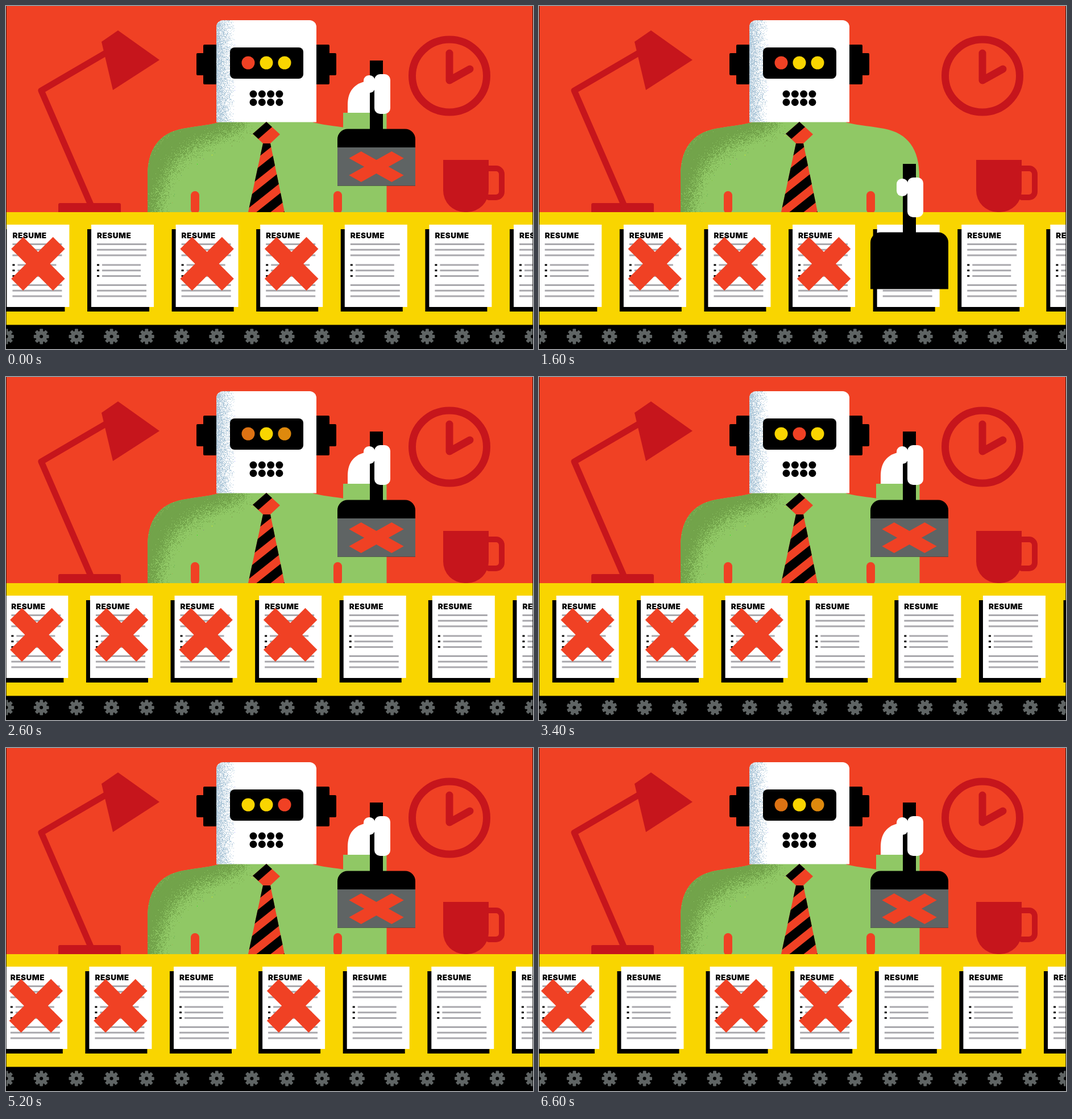
An HTML page with a canvas for the animation above (6800 ms loop, 927x604 px).

```html
<!DOCTYPE html>
<html lang="en">
<head>
<meta charset="utf-8">
<title>Resume robot</title>
<style>
html, body { margin: 0; width: 100%; height: 100%; overflow: hidden; background: #f04124; }
canvas { display: block; }
</style>
</head>
<body>
<canvas id="stage" width="927" height="604"></canvas>
<script>
const W = 927, H = 604, LOOP = 6800, STEP = 200, CYCLE = 4000 / 3;
const RED = '#f04124', DARK = '#c6151c', GREEN = '#90c865', SHADE = '#72a34a',
      YELLOW = '#f9d500', GRAY = '#5f6464', LINE = '#a9a8ad';
const stage = document.getElementById('stage').getContext('2d');
let g = stage;

const clamp = v => Math.max(0, Math.min(1, v));
const smooth = v => { v = clamp(v); return v * v * (3 - 2 * v); };

function box(color, x, y, w, h, r = 0) {
  g.fillStyle = color;
  g.beginPath();
  g.roundRect(x, y, w, h, r);
  g.fill();
}
function dot(color, x, y, r) {
  g.fillStyle = color;
  g.beginPath();
  g.arc(x, y, r, 0, Math.PI * 2);
  g.fill();
}
function shape(color, d) {
  g.fillStyle = color;
  g.fill(new Path2D(d));
}
function line(color, width, d) {
  g.strokeStyle = color;
  g.lineWidth = width;
  g.stroke(new Path2D(d));
}
function at(x, y, draw) {
  g.save();
  g.translate(x, y);
  draw();
  g.restore();
}
function layer(draw) {
  const canvas = document.createElement('canvas');
  canvas.width = W;
  canvas.height = H;
  const before = g;
  g = canvas.getContext('2d');
  g.lineCap = g.lineJoin = 'round';
  draw();
  g = before;
  return canvas;
}

let seed = 7;
const random = () => (seed = seed * 16807 % 2147483647) / 2147483647;

// Turns a soft tone into single-pixel grain inside the given outline.
function grain(outline, tone) {
  return layer(() => {
    tone();
    const image = g.getImageData(0, 0, W, H);
    for (let i = 3; i < image.data.length; i += 4)
      if (image.data[i]) image.data[i] = image.data[i] > random() * 255 ? 255 : 0;
    g.putImageData(image, 0, 0);
    g.filter = 'none';
    g.globalCompositeOperation = 'destination-in';
    shape('#000', outline);
  });
}

const BODY = 'M249 363V300C249 252 269 224 311 216C331 212 351 211 375 205V200H540V205' +
             'C565 211 587 212 607 216C649 224 669 252 669 300V363Z';
const HEAD = 'M370 204.5V37A12 12 0 0 1 382 25H534A12 12 0 0 1 546 37V204.5Z';

const bodyGrain = grain(BODY, () => {
  g.filter = 'blur(11px)';
  line(SHADE, 62, 'M234 375C244 290 262 228 388 194');
});
const headGrain = grain(HEAD, () => {
  const fade = g.createLinearGradient(370, 0, 403, 0);
  fade.addColorStop(0, 'rgba(178,202,219,.9)');
  fade.addColorStop(1, 'rgba(178,202,219,0)');
  g.fillStyle = fade;
  g.fillRect(370, 25, 33, 180);
});

function drawOffice() {
  box(RED, 0, 0, W, H);
  // Lamp
  box(DARK, 92, 347, 110, 20, 3);
  line(DARK, 11, 'M150 352L62 149L180 80');
  shape(DARK, 'M168 63L197 43L270 95L188 148Z');
  // Clock
  line(DARK, 13, 'M845.5 123A65.5 64 0 1 1 714.5 123A65.5 64 0 1 1 845.5 123');
  line(DARK, 13, 'M780 83V131L816 111');
  // Mug
  shape(DARK, 'M769 271H849V325A38 38 0 0 1 811 363H807A38 38 0 0 1 769 325Z');
  line(DARK, 10, 'M849 286H862A10 10 0 0 1 872 296V327A10 10 0 0 1 862 337H849');
}

function drawTie() {
  shape(RED, 'M458 204L482 226L465 242L490 363H426L452 242L434 225Z');
  shape('#000', 'M458 204L468 213L444 234L434 225Z');
  g.save();
  g.clip(new Path2D('M452 242H465L490 363H426Z'));
  for (let y = 235; y < 400; y += 38)
    shape('#000', `M418 ${y + 32}L498 ${y - 32}V${y - 12}L418 ${y + 52}Z`);
  g.restore();
}

function drawRobot() {
  shape(GREEN, BODY);
  g.drawImage(bodyGrain, 0, 0);
  for (const x of [325, 576]) box(RED, x, 326, 15, 40, 7.5);
  box('#000', 347, 68, 222, 70, 2);
  box('#000', 335, 83, 246, 39, 2);
  shape('#fff', HEAD);
  g.drawImage(headGrain, 0, 0);
  drawTie();
  box('#000', 394, 73, 129, 55, 8);
  for (let i = 0; i < 8; i++)
    dot('#000', 435 + i % 4 * 15.3, i < 4 ? 155 : 169.5, 6.5);
}

function drawCross() {
  for (const turn of [1, -1]) {
    g.save();
    g.rotate(turn * Math.PI / 4);
    box(RED, -52, -14.8, 104, 29.6);
    g.restore();
  }
}

function drawPaper(stamped) {
  box('#000', -7, 393, 109, 145);
  box('#fff', 0, 385, 110, 145);
  g.fillStyle = '#000';
  g.font = '900 13.5px Inter, sans-serif';
  g.letterSpacing = '0.5px';
  g.fillText('RESUME', 10, 409);
  for (let i = 0; i < 3; i++) {
    const y = i * 9.7;
    box(LINE, 10, 418 + y, 87, 3);
    box('#000', 10, 454.5 + y, 4, 3);
    box(LINE, 19, 454.5 + y, 68, 3);
    box(LINE, 10, 490 + y, 87, 3);
  }
  if (stamped) at(55, 454, drawCross);
}

function drawGear(angle) {
  g.rotate(angle);
  dot(GRAY, 0, 0, 10);
  for (let i = 0; i < 4; i++) {
    box(GRAY, -2.9, -13.4, 5.8, 26.8, 1);
    g.rotate(Math.PI / 4);
  }
  dot('#000', 0, 0, 3);
}

function drawStamper(faceUp) {
  if (faceUp) shape('#fff', 'M601 188V174C601 151 612 137 632 133L641 140V188Z');
  box('#000', 640, 96, 23, 124);
  box('#fff', 629, 122, 20, 31, 9.5);
  box('#fff', 648, 120, 28, 70, 10);
  box('#000', 583, 216.5, 137, 100, [18, 18, 0, 0]);
  if (faceUp) {
    box(GRAY, 583, 249, 137, 67.5);
    at(651.5, 283, () => { g.scale(1.02, .57); drawCross(); });
  }
}

// Quick start, long settling end: a cubic curve with handles (.3, 0) and (.055, 1).
function beltEase(p) {
  let low = 0, high = 1;
  for (let i = 0; i < 24; i++) {
    const s = (low + high) / 2, r = 1 - s;
    if (.9 * r * r * s + .165 * r * s * s + s ** 3 < p) low = s; else high = s;
  }
  return low * low * (3 - 2 * low);
}

// The red light passes from lamp to lamp in the last part of each third.
function drawLights(u) {
  const third = Math.floor(u * 3) % 3, fade = clamp((u * 3 % 1 - .75) / .17);
  for (let i = 0; i < 3; i++) {
    const a = i === third ? 1 - fade : i === (third + 1) % 3 ? fade : 0;
    const dim = 1 - .4 * a * (1 - a);
    const mix = (from, to) => Math.round((from + (to - from) * a) * dim);
    dot(`rgb(${mix(249, 240)},${mix(213, 65)},${mix(0, 36)})`, 426 + i * 32, 100, 11.5);
  }
}

const scene = layer(() => { drawOffice(); drawRobot(); });

function draw(time) {
  const cycle = Math.floor(time / CYCLE + 1e-6);
  const u = Math.max(0, time / CYCLE - cycle);
  const current = cycle + 4;
  const rejected = j => j % 5 !== 1;
  const drop = rejected(current) ? smooth((u - .05) / .08) - smooth((u - .22) / .1) : 0;
  const dy = 182 * drop, faceUp = drop < .5;
  const moved = u > .22 ? beltEase((u - .22) / .78) : 0;

  g.drawImage(scene, 0, 0);
  drawLights(u);
  if (faceUp) box(GREEN, 593, 188 + dy, 76.5, 175 - dy);
  box(YELLOW, 0, 363, W, 199);
  box('#000', 0, 561.5, W, 43);

  for (let j = 0; j < 13; j++) {
    const x = 1.4 + 148.6 * j + (j > 6 ? 7.5 : 0) - 149.75 * (cycle + moved);
    const passed = j < current || j === current && u > .22;
    if (x > -120 && x < W + 10) at(x, 0, () => drawPaper(passed && rejected(j)));
  }
  for (let i = 0; i < 16; i++)
    at(i * 61.7 + .5, 582, () => drawGear(-moved * Math.PI / 2));
  at(0, dy, () => drawStamper(faceUp));
  box('rgba(0,0,0,.7)', 0, 0, 1, H);
  box('rgba(0,0,0,.7)', W - 1, 0, 1, H);
}

const start = performance.now();
function tick() {
  const elapsed = (performance.now() - start) % LOOP;
  draw(Math.floor(elapsed / STEP) * STEP);
  requestAnimationFrame(tick);
}
tick();
</script>
</body>
</html>
```
